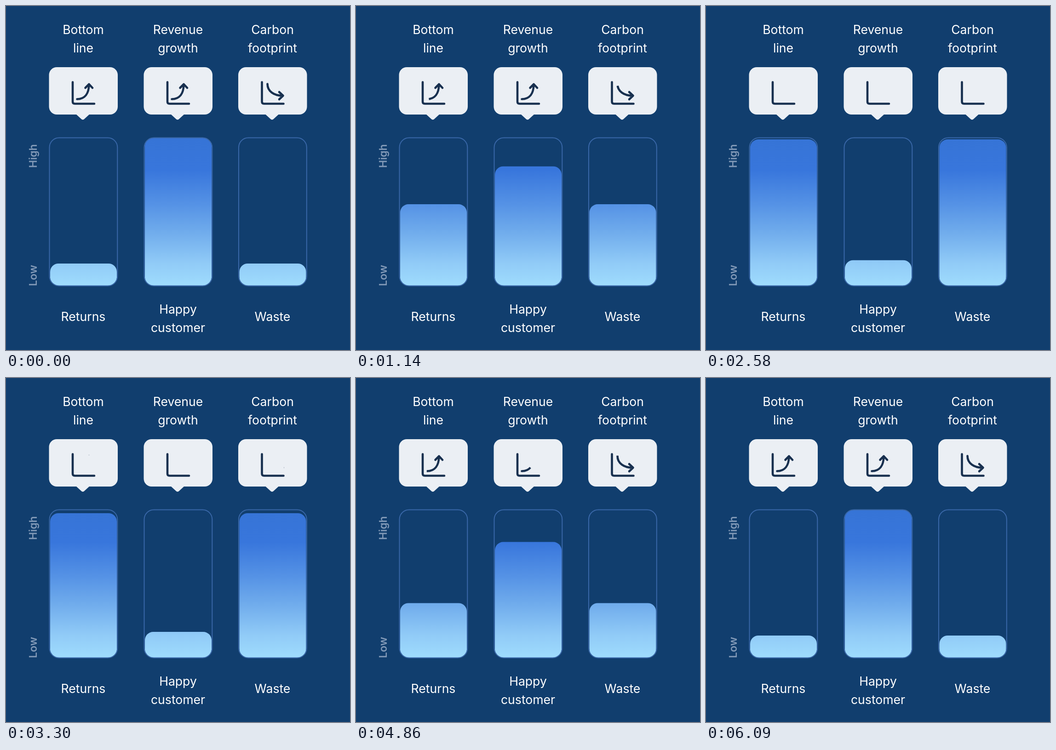
These frames come from a looping animation (748 px wide and 748 px high, 6300 ms). An HTML page:

```html
<!DOCTYPE html>
<html lang="en">
<head>
<meta charset="utf-8">
<style>
  html, body { margin: 0; height: 100%; overflow: hidden; background: #113e6e; }
  svg { display: block; width: 748px; height: 748px; font: 26.6px Inter, "Open Sans", sans-serif; }
  .label { fill: #fff; text-anchor: middle; }
  .scale { fill: #8199b7; font-size: 23px; font-weight: 600; }
  .icon { fill: none; stroke: #18304f; stroke-width: 4.6; stroke-linecap: round; stroke-linejoin: round; }
  .wipe { fill: none; stroke: #fff; stroke-width: 26; }
</style>
</head>
<body>
<svg id="stage" viewBox="0 0 748 748">
  <defs>
    <linearGradient id="fill" gradientUnits="userSpaceOnUse" x1="0" y1="286" x2="0" y2="608">
      <stop offset="0" stop-color="#3674d6"/>
      <stop offset=".22" stop-color="#3876dc"/>
      <stop offset=".45" stop-color="#5592e5"/>
      <stop offset=".64" stop-color="#70acec"/>
      <stop offset=".85" stop-color="#91cbf7"/>
      <stop offset="1" stop-color="#9fdcfd"/>
    </linearGradient>
    <clipPath id="tube"><rect x="95.5" y="287" width="146" height="321" rx="20"/></clipPath>
  </defs>
  <text class="scale" transform="translate(67 352) rotate(-90)">High</text>
  <text class="scale" transform="translate(67 609) rotate(-90)">Low</text>
</svg>
<script>
const LOOP = 6300, STEP = 30, LOW = 560, HIGH = 286, FLOOR = 608;
const stage = document.getElementById('stage');

// The wipe path runs in the direction in which the arrow is revealed.
const rise = {
  arrow: 'M154.5 202.5C172 202.5 180 190 180.5 171M172.5 178L180.5 170L188 178',
};
const fall = {
  arrow: 'M157 169.5C157 185 170.5 195 190.5 195M182.5 187L191 195L182.5 203',
  wipe: 'M194 195H190.5C170.5 195 157 185 157 169.5V166.5',
};
const fromTip = 'M180.5 167V171C180 190 172 202.5 154.5 202.5H151.5';
const fromTail = 'M151.5 202.5H154.5C172 202.5 180 190 180.5 171V167';

const outer = {
  from: LOW, to: HIGH, up: [0, 2840],
  hide: [980, 2220], show: [3270, 4930],
};
const inner = {
  from: HIGH, to: LOW, up: [595, 2860],
  hide: [1290, 2520], show: [4320, 5520],
};
const back = [3090, 6040];

const columns = [
  { x: 0, top: ['Bottom', 'line'], bottom: ['Returns'], arrow: rise.arrow, wipe: fromTip, ...outer },
  { x: 206, top: ['Revenue', 'growth'], bottom: ['Happy', 'customer'], arrow: rise.arrow, wipe: fromTail, ...inner },
  { x: 411.5, top: ['Carbon', 'footprint'], bottom: ['Waste'], ...fall, ...outer },
];

const lines = (words, y, gap) => words.map((word, i) =>
  `<text class="label" x="168" y="${y + i * gap}">${word}</text>`).join('');

columns.forEach((c, i) => {
  const g = document.createElementNS('http://www.w3.org/2000/svg', 'g');
  g.setAttribute('transform', `translate(${c.x})`);
  g.innerHTML = `
    ${lines(c.top, 61, 40)}
    ${lines(c.bottom, c.bottom.length > 1 ? 669 : 685, 39.5)}
    <g fill="#ebeff4">
      <rect x="93.5" y="133" width="149.5" height="103" rx="17"/>
      <path d="M152 235L164 246Q167 248.5 170 246L182 235Z"/>
    </g>
    <mask id="mask${i}" maskUnits="userSpaceOnUse" x="93" y="133" width="150" height="103">
      <path class="wipe" pathLength="1" d="${c.wipe}"/>
    </mask>
    <path class="icon" d="M145 165.5V208Q145 212.5 149.5 212.5H192"/>
    <g mask="url(#mask${i})"><path class="icon" d="${c.arrow}"/></g>
    <g clip-path="url(#tube)"><rect class="bar" x="96" width="145" rx="18" fill="url(#fill)"/></g>
    <rect x="94.5" y="286.5" width="147.8" height="322" rx="21" fill="none" stroke="#3967a8" stroke-width="2"/>`;
  stage.append(g);
  c.bar = g.querySelector('.bar');
  c.mask = g.querySelector('.wipe');
});

const progress = (t, [a, b]) => Math.min(1, Math.max(0, (t - a) / (b - a)));

// Cubic bezier easing (.22, 0, .57, 1), solved by bisection.
function ease(x) {
  let lo = 0, hi = 1;
  for (let i = 0; i < 24; i++) {
    const s = (lo + hi) / 2, r = 1 - s;
    if (.66 * s * r * r + 1.71 * s * s * r + s ** 3 < x) lo = s; else hi = s;
  }
  return lo * lo * (3 - 2 * lo);
}

function draw(now) {
  const t = Math.floor(now % LOOP / STEP) * STEP;
  for (const c of columns) {
    const level = ease(progress(t, c.up)) - ease(progress(t, back));
    const y = c.from + (c.to - c.from) * level;
    c.bar.setAttribute('y', y);
    c.bar.setAttribute('height', FLOOR - y);
    const shown = 1 - progress(t, c.hide) + progress(t, c.show);
    c.mask.style.visibility = shown > 0 ? 'visible' : 'hidden';
    c.mask.setAttribute('stroke-dasharray', `${shown} 2`);
  }
  requestAnimationFrame(draw);
}
requestAnimationFrame(draw);
</script>
</body>
</html>
```
